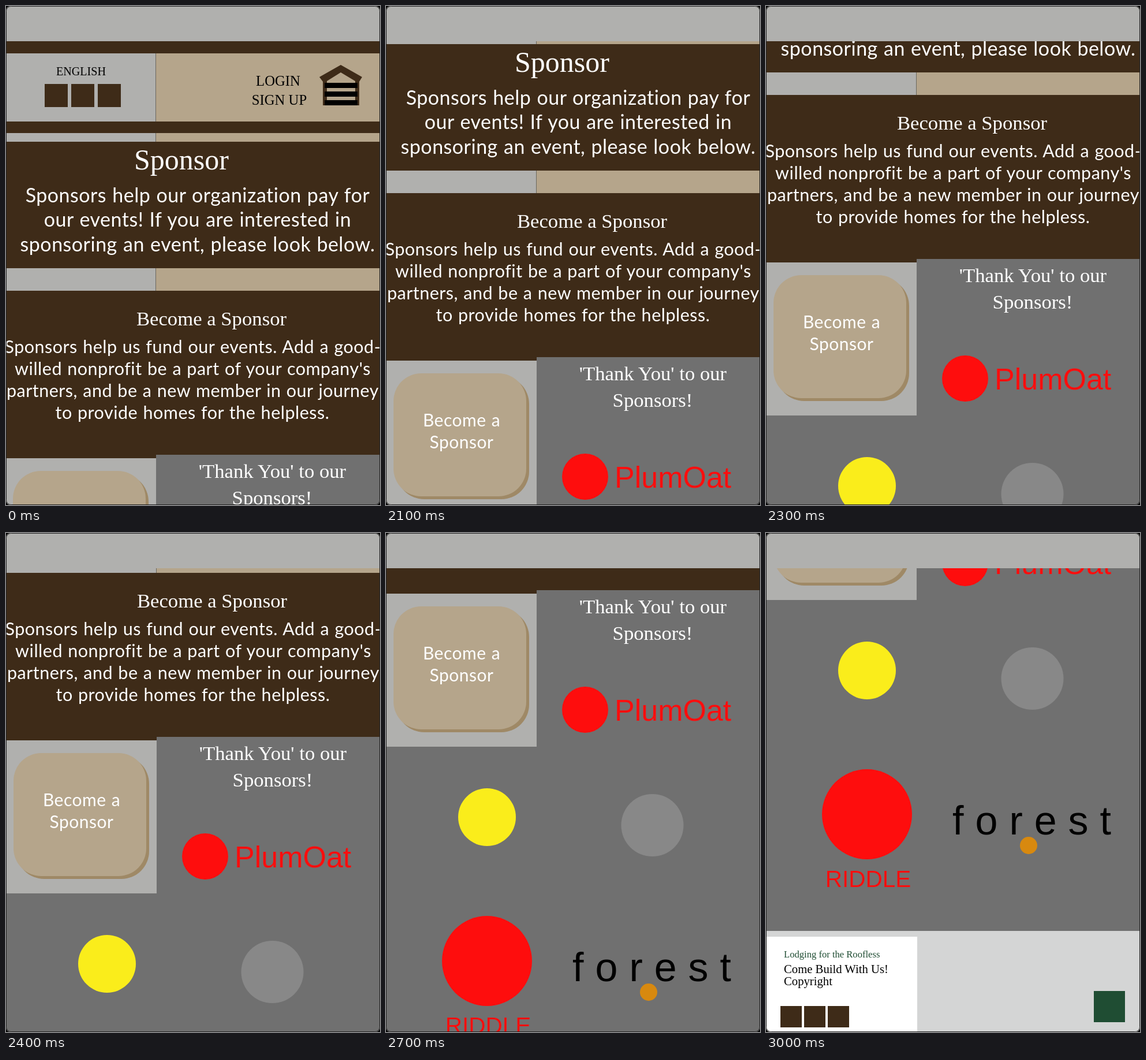
Recreate the animation shown at these times as an HTML page. Size 648x864 px, loop 5000 ms.

```html
<!DOCTYPE html>
<html lang="en">
<head>
<meta charset="utf-8">
<title>Sponsor page</title>
<style>
  html, body { margin: 0; width: 100%; height: 100%; overflow: hidden; background: #000; }
  svg { display: block; width: 648px; height: 864px; }
  .serif { font-family: "Liberation Serif", serif; }
  .sans { font-family: Lato, sans-serif; letter-spacing: .5px; word-spacing: 1px; }
  .plain { font-family: "Liberation Sans", sans-serif; }
  .light { fill: #fff; }
  .mid { text-anchor: middle; }
  .brown { fill: #3e2b18; }
  .silver { fill: #b0b0ae; }
  .tan { fill: #b5a58b; }
  .red { fill: #fe0d0d; }
  .green { fill: #1f4d33; }
</style>
</head>
<body>
<svg viewBox="0 0 648 864">
  <defs>
    <clipPath id="screen"><rect width="648" height="864" rx="8"/></clipPath>
    <clipPath id="viewport"><rect y="61" width="648" height="803"/></clipPath>
  </defs>
  <g clip-path="url(#screen)">
    <rect class="silver" width="648" height="864"/>
    <g clip-path="url(#viewport)">
      <g id="page">
        <!-- page background -->
        <rect class="silver" x="-2" y="61" width="262" height="990"/>
        <rect class="tan" x="260" y="61" width="390" height="720"/>
        <rect x="259" y="61" width="1" height="720" fill="#6b675f"/>
        <g class="brown">
          <rect x="-2" y="61" width="652" height="21"/>
          <rect x="-2" y="200" width="652" height="20"/>
          <rect x="-2" y="235" width="652" height="219"/>
          <rect x="-2" y="493" width="652" height="290"/>
        </g>
        <path d="M260 777H650V1621H-2V1048H260Z" fill="#707070"/>

        <!-- header -->
        <g class="serif">
          <text class="mid" x="130" y="120" font-size="20.1">ENGLISH</text>
          <text class="mid" x="471.5" y="138" font-size="24.7">LOGIN</text>
          <text class="mid" x="473.5" y="171" font-size="24.7">SIGN UP</text>
        </g>
        <path class="brown" d="M67 135h40v40h-40zM113 135h40v40h-40zM159 135h40v40h-40z"/>
        <path class="brown" d="M580 102L617 123L612 131V172H605V130L580 115L556 130V172H549V131L543 123Z"/>
        <path d="M552 133h57v9h-57zM552 148h57v9h-57zM552 163h57v9h-57z"/>

        <!-- copy -->
        <g class="serif light mid">
          <text x="304" y="283" font-size="50">Sponsor</text>
          <text x="356" y="553" font-size="34.7">Become a Sponsor</text>
          <g font-size="34.7">
            <text x="461.5" y="817">'Thank You' to our</text>
            <text x="461" y="863">Sponsors!</text>
          </g>
        </g>
        <g class="sans light mid">
          <g font-size="34">
            <text x="332" y="340">Sponsors help our organization pay for</text>
            <text x="332" y="382">our events! If you are interested in</text>
            <text x="332" y="425">sponsoring an event, please look below.</text>
          </g>
          <g font-size="30.5">
            <text x="323.5" y="601">Sponsors help us fund our events. Add a good-</text>
            <text x="323.5" y="639">willed nonprofit be a part of your company's</text>
            <text x="323.5" y="677">partners, and be a new member in our journey</text>
            <text x="323" y="715">to provide homes for the helpless.</text>
          </g>
        </g>

        <!-- button -->
        <rect x="17" y="810" width="230" height="213" rx="48" fill="#9f8966"/>
        <rect class="tan" x="12" y="805" width="230" height="213" rx="48"/>
        <g class="sans light mid" font-size="30">
          <text x="130" y="897">Become a</text>
          <text x="130" y="935">Sponsor</text>
        </g>

        <!-- sponsors -->
        <ellipse class="red" cx="344" cy="984" rx="40" ry="40"/>
        <ellipse cx="174" cy="1170" rx="50" ry="50" fill="#faed1b"/>
        <ellipse cx="460.5" cy="1184" rx="54" ry="54" fill="#888"/>
        <ellipse class="red" cx="174" cy="1419" rx="78" ry="78"/>
        <ellipse cx="454" cy="1473" rx="15" ry="15" fill="#d8890f"/>
        <g class="plain">
          <text class="red" x="395" y="1003" font-size="52">PlumOat</text>
          <text class="red mid" x="176" y="1545" font-size="40.5">RIDDLE</text>
          <text x="322" y="1454" font-size="70" letter-spacing="20">forest</text>
        </g>

        <!-- footer -->
        <rect x="-2" y="1621" width="652" height="180" fill="#d4d5d5"/>
        <rect x="-2" y="1631" width="263" height="170" fill="#fff"/>
        <g class="serif">
          <text class="green" x="30" y="1667" font-size="16.6">Lodging for the Roofless</text>
          <text x="30" y="1694" font-size="20.7">Come Build With Us!</text>
          <text x="30" y="1715" font-size="20.7">Copyright</text>
        </g>
        <path class="brown" d="M24 1751h37v37h-37zM65 1751h37v37h-37zM106 1751h37v37h-37z"/>
        <rect class="green" x="567" y="1725" width="54" height="54"/>
      </g>
    </g>
  </g>
  <rect x=".5" y=".5" width="647" height="863" rx="8" fill="none" stroke="#222"/>
</svg>
<script>
  const LOOP = 5000, START = 2000, STEP = 100, STEPS = 11, DISTANCE = 932;

  const pose = (step, offset) => ({
    offset,
    easing: 'steps(1, end)',
    transform: `translate(${step > 1 ? 1 : 0}px, ${-Math.round(DISTANCE * step / STEPS)}px)`
  });

  const frames = [pose(0, 0)];
  for (let step = 1; step <= STEPS; step++) {
    frames.push(pose(step, (START + (step - 1) * STEP) / LOOP));
  }
  frames.push(pose(STEPS, 1));

  document.getElementById('page').animate(frames, { duration: LOOP, iterations: Infinity });
</script>
</body>
</html>
```
